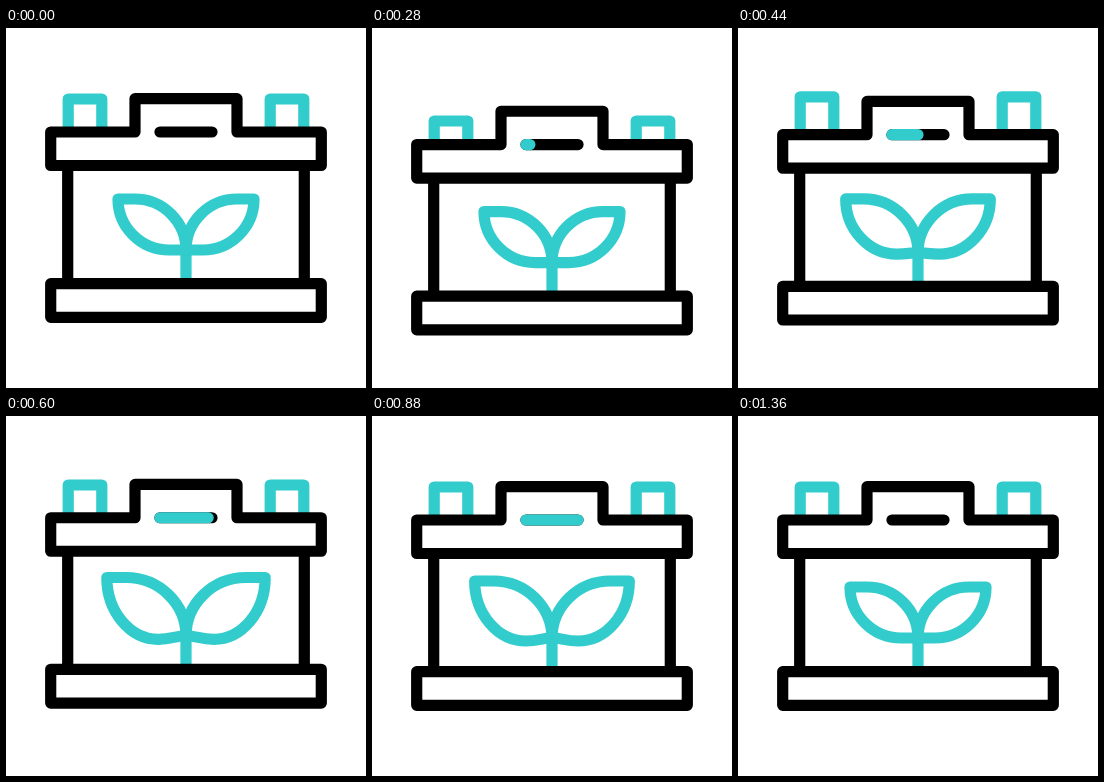
These frames come from a looping animation (360x360 px, 1480 ms). An HTML page:

```html
<!DOCTYPE html>
<html lang="en">
<head>
<meta charset="utf-8">
<title>Green battery</title>
<style>
  html, body { margin: 0; width: 100%; height: 100%; overflow: hidden; background: #fff; }
  svg { display: block; width: 100%; height: 100%; }
  path { fill: none; stroke: #000; stroke-width: 11.2; stroke-linecap: round; stroke-linejoin: round; }
  .teal { stroke: #33cccc; }
  .solid { fill: #fff; }
</style>
</head>
<body>
<svg viewBox="0 0 360 360">
  <path id="terminals" class="teal" d="M62.2 125V71H95.8V125M264.2 125V71H297.8V125"/>
  <g id="body">
    <path d="M61.7 137V255M298.3 137V255"/>
    <path class="teal" d="M180 222V252"/>
    <path class="teal leaf" transform="translate(180 0)"/>
    <path class="teal leaf" transform="translate(180 0) scale(-1 1)"/>
    <path class="solid" d="M44.7 255.6H315.3V289.3H44.7Z"/>
    <path class="solid" d="M129 104V70.7H231V104H315.3V137.5H44.7V104Z"/>
    <path d="M154 104H206"/>
    <path class="teal" id="charge"/>
  </g>
</svg>
<script>
const LOOP = 1480, STEP = 40;
const $ = id => document.getElementById(id);

// Smooth progress from 0 to 1 between two times.
function ease(t, start, end) {
  const p = Math.min(1, Math.max(0, (t - start) / (end - start)));
  return p * p * (3 - 2 * p);
}

// Left leaf with its foot on the stem at x = 0; growth widens it and makes it sag.
function leafPath(growth) {
  const foot = 222, round = 0.55;
  const width = 68 + 9.3 * growth;
  const top = 171 - 6 * growth;
  const bottom = foot + 3 * growth;
  const sag = 17 + 9 * growth;
  const edge = width - 17 - 2 * growth;
  const reach = sag + (width - sag) * round;
  return `M0 ${foot}C${-sag * 0.4} ${foot} ${-sag * 0.5} ${bottom} ${-sag} ${bottom}
    C${-reach} ${bottom} ${-width} ${top + (bottom - top) * round} ${-width} ${top}
    H${-edge}C${-edge * (1 - round)} ${top} 0 ${foot - (foot - top) * round} 0 ${foot}Z`;
}

function draw(now) {
  const t = Math.floor((now % LOOP) / STEP) * STEP;
  const reset = ease(t, 1120, 1360);

  // Each part sinks, springs past its rest position and settles.
  const bodyY = 14 * ease(t, 120, 320) - 18 * ease(t, 320, 525) + 4 * ease(t, 525, 690);
  const terminalsY = 22 * ease(t, 80, 250) - 26 * ease(t, 335, 460) + 4 * ease(t, 520, 680);
  const growth = 1.25 * ease(t, 300, 640) - 0.25 * ease(t, 640, 880) - reset;
  const charge = ease(t, 200, 680) - reset;

  $("body").setAttribute("transform", `translate(0 ${bodyY})`);
  $("terminals").setAttribute("transform", `translate(0 ${terminalsY})`);
  for (const leaf of document.querySelectorAll(".leaf")) leaf.setAttribute("d", leafPath(growth));
  $("charge").setAttribute("d", charge > 0 ? `M154 104h${52 * charge}` : "");
}

const begin = performance.now();
function tick() {
  draw(performance.now() - begin);
  requestAnimationFrame(tick);
}
tick();
</script>
</body>
</html>
```
